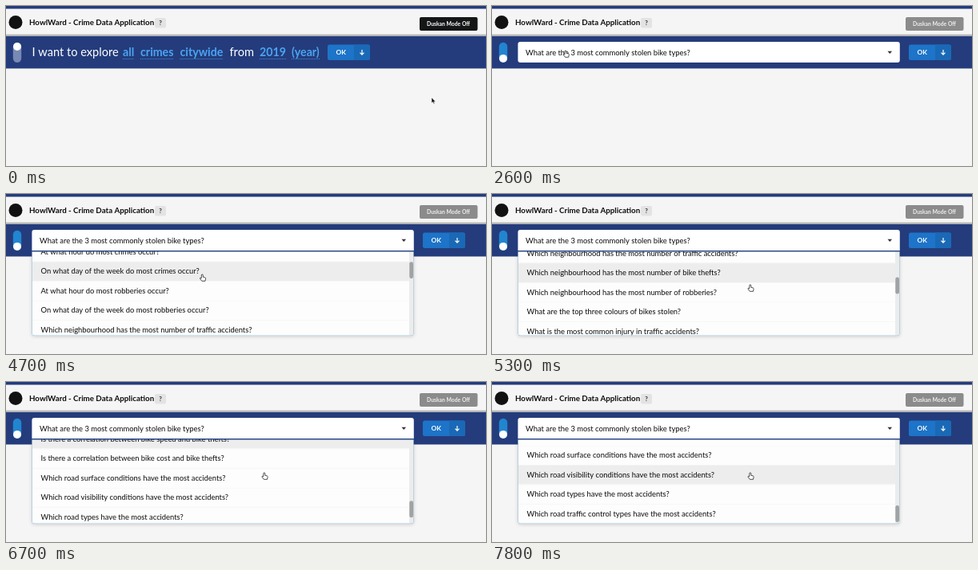
Animation of 600x201 px, one loop 8 s. Source, as an HTML page with a canvas:

```html
<!DOCTYPE html>
<html lang="en">
<head>
<meta charset="utf-8">
<title>Crime Data Application</title>
<style>
  html, body { margin: 0; width: 100%; height: 100%; overflow: hidden; background: #f5f5f5; }
  canvas { display: block; }
</style>
</head>
<body>
<canvas id="stage" width="600" height="201"></canvas>
<script>
const ctx = document.getElementById('stage').getContext('2d');
const LOOP = 8000, STEP = 100, ROW = 24.5;
const NAVY = '#243c7c', BLUE = '#1d74c8', LINK = '#4aa5f2', INK = '#0c0c0d', BORDER = '#a9cfe0';
const TEXT_SIZE = 9.39;
const TOGGLED = 1800, OPENED = 2700;

const questions = [
  'What are the 3 most commonly stolen bike types?',
  'How many stolen bikes were recovered?',
  'At what hour do most crimes occur?',
  'On what day of the week do most crimes occur?',
  'At what hour do most robberies occur?',
  'On what day of the week do most robberies occur?',
  'Which neighbourhood has the most number of traffic accidents?',
  'Which neighbourhood has the most number of bike thefts?',
  'Which neighbourhood has the most number of robberies?',
  'What are the top three colours of bikes stolen?',
  'What is the most common injury in traffic accidents?',
  'What is the most common vehicle type in traffic accidents?',
  'What is the most common driver action taken in traffic accidents?',
  'Is there a correlation between neighbourhood employment and crime?',
  'Is there a correlation between neighbourhood income and crime?',
  'Is there a correlation between bike speed and bike thefts?',
  'Is there a correlation between bike cost and bike thefts?',
  'Which road surface conditions have the most accidents?',
  'Which road visibility conditions have the most accidents?',
  'Which road types have the most accidents?',
  'Which road traffic control types have the most accidents?'
];
const MAX_SCROLL = 408.5;

// Keys are [time, value...]
const scrollKeys = [[3600, 0], [3800, 14], [4100, 50], [4300, 60.5], [4700, 60.5], [4900, 90], [5200, 140],
  [5500, 190], [5800, 211], [5900, 211], [6000, 233.5], [6200, 290], [6400, 325], [6500, 334],
  [6600, 350], [6700, 380], [6800, 400], [7000, MAX_SCROLL]];
const handKeys = [[1000, 14, 61], [2300, 14, 61], [2600, 92, 56], [2800, 98, 57], [3100, 108, 96],
  [3600, 108, 96], [4400, 245.3, 101], [4700, 245.3, 101], [5200, 322.8, 114]];
const hoverKeys = [[0, -1], [3700, 1], [4500, 3], [5300, 7], [5800, 10], [6500, 15], [7200, 18]];

function sample(keys, t) {
  const i = keys.findIndex(k => k[0] > t);
  if (i === 0) return keys[0].slice(1);
  if (i < 0) return keys[keys.length - 1].slice(1);
  const a = keys[i - 1], b = keys[i], u = (t - a[0]) / (b[0] - a[0]);
  return a.slice(1).map((v, j) => v + (b[j + 1] - v) * u);
}

function rect(x, y, w, h, color, radius = 0) {
  ctx.beginPath();
  ctx.roundRect(x, y, w, h, radius);
  ctx.fillStyle = color;
  ctx.fill();
}

function disc(x, y, r, color) {
  rect(x - r, y - r, 2 * r, 2 * r, color, r);
}

// y is the middle of the capitals
function text(str, x, y, size, color, weight = 400, align = 'left') {
  ctx.font = `${weight} ${size}px Lato, sans-serif`;
  ctx.textAlign = align;
  ctx.fillStyle = color;
  ctx.fillText(str, x, y + size * .36);
}

function shape(d, x, y, fill, stroke, width = .8) {
  ctx.save();
  ctx.translate(x, y);
  const path = new Path2D(d);
  if (fill) { ctx.fillStyle = fill; ctx.fill(path); }
  if (stroke) { ctx.strokeStyle = stroke; ctx.lineWidth = width; ctx.stroke(path); }
  ctx.restore();
}

function header(on) {
  rect(0, 0, 600, 201, '#f5f5f5');
  rect(0, 0, 600, 3.5, NAVY);
  rect(0, 35, 600, 1, '#dedede');
  rect(0, 36, 600, 2, '#b4b4b4');
  rect(0, 38, 600, 40.6, NAVY);
  disc(12, 20.5, 8.5, '#111');
  text('HowlWard - Crime Data Application', 29, 20.5, 9.75, INK, 700);
  rect(186, 15, 14, 12.5, '#e3e3e3', 2);
  text('?', 193, 21.3, 7.8, '#333', 700, 'center');
  rect(517, 14, 72.5, 17, on ? '#8b8b8b' : '#151617', 2);
  text('Duskan Mode Off', 553, 22.6, 6.8, on ? '#eee' : '#fff', 700, 'center');
}

function toggle(t) {
  const on = t >= TOGGLED, hover = t >= 1000 && t < 2300;
  rect(8.8, 45.7, 10.4, 25.2, on ? '#2185d0' : hover ? '#5d74a8' : '#7889b5', 5.2);
  const u = Math.max(0, Math.min(1, (t - TOGGLED + 100) / 200));
  disc(14, 51 + 14.9 * u, 5, '#fff');
}

function okButton(x) {
  rect(x, 48.5, 53, 19.5, BLUE, 2.5);
  rect(x + 33, 48.5, 20, 19.5, '#1a69b6', [0, 2.5, 2.5, 0]);
  text('OK', x + 16.7, 58.4, 8.4, '#fff', 700, 'center');
  shape('M0-3V3M-2.5.6L0 3.1L2.5.6', x + 43, 58, null, '#fff', 1.2);
}

function sentence() {
  text('I want to explore', 32.5, 57.8, 14.6, '#fff');
  text('from', 279.5, 57.8, 14.6, '#fff');
  for (const [word, x] of [['all', 146], ['crimes', 168], ['citywide', 217.5], ['2019', 317], ['(year)', 357]]) {
    text(word, x, 57.8, 14.2, LINK, 700);
    const w = ctx.measureText(word).width;
    ctx.strokeStyle = LINK;
    ctx.lineWidth = .8;
    ctx.setLineDash([1, 1]);
    ctx.beginPath();
    ctx.moveTo(x, 66.5);
    ctx.lineTo(x + w, 66.5);
    ctx.stroke();
    ctx.setLineDash([]);
  }
}

function menu(t) {
  const scroll = sample(scrollKeys, t)[0];
  const hover = hoverKeys.filter(k => k[0] <= t).pop()[1];
  const height = 106 * Math.min(1, (t - OPENED + 100) / 200);
  ctx.save();
  ctx.shadowColor = 'rgba(34,36,38,.2)';
  ctx.shadowBlur = 4;
  ctx.shadowOffsetY = 1;
  rect(32.3, 72, 477.4, height, BORDER, [0, 0, 3, 3]);
  ctx.restore();

  ctx.save();
  ctx.beginPath();
  ctx.roundRect(33, 72, 476, height - .7, [0, 0, 2.5, 2.5]);
  ctx.clip();
  rect(33, 72, 476, 106, '#fff');
  questions.forEach((question, i) => {
    const y = 84 + ROW * i - scroll;
    if (y < 55 || y > 195) return;
    const fill = i === hover ? '#ededed' : i === 0 ? '#f4f4f4' : '#fdfdfd';
    rect(33, y - ROW / 2, 471, ROW, fill);
    rect(33, y - ROW / 2, 471, .7, '#f6f6f6');
    text(question, 43.5, y, TEXT_SIZE, INK, i ? 400 : 700);
  });
  rect(504, 72, 5, 106, '#ececec');
  rect(504.3, 73 + 82 * scroll / MAX_SCROLL, 4.7, 21, '#a2a2a2', 2.3);
  ctx.restore();
  rect(32.3, 71, 477.4, 1.4, '#2b4a8a');
}

function dropdown(t) {
  const open = t >= OPENED;
  rect(32.4, 45, 477.4, 26, '#fff', open ? [3, 3, 0, 0] : 3);
  text(questions[0], 42, 58.3, TEXT_SIZE, INK);
  shape('M-2.8-1.5H2.8L0 1.7Z', 497.3, 58.2, '#333');
  if (open) menu(t);
}

function cursor(t) {
  if (t < 1000) {
    const v = t / 1000, u = v * v * (3 - 2 * v);
    const bend = (a, b, c) => a * (1 - u) ** 2 + 2 * b * u * (1 - u) + c * u * u;
    shape('M0 0V7L1.6 5.6L2.7 8L3.8 7.5L2.8 5.2H4.9Z',
      bend(532, 400, 14), bend(115, 190, 61), '#111', '#fff', .5);
    return;
  }
  const [x, y] = sample(handKeys, t);
  shape('M-1 1Q-1 0 0 0Q1 0 1 1V3.3L3.6 4Q4.5 4.3 4.3 5.4L3.7 8.3H-.5L-3 5Q-3 3.7-1 4.8Z', x, y, '#fff', '#222');
}

function draw(now) {
  const t = Math.floor(now % LOOP / STEP) * STEP, on = t >= TOGGLED;
  header(on);
  toggle(t);
  if (on) dropdown(t); else sentence();
  okButton(on ? 521 : 402);
  cursor(t);
  requestAnimationFrame(draw);
}
requestAnimationFrame(draw);
</script>
</body>
</html>
```
